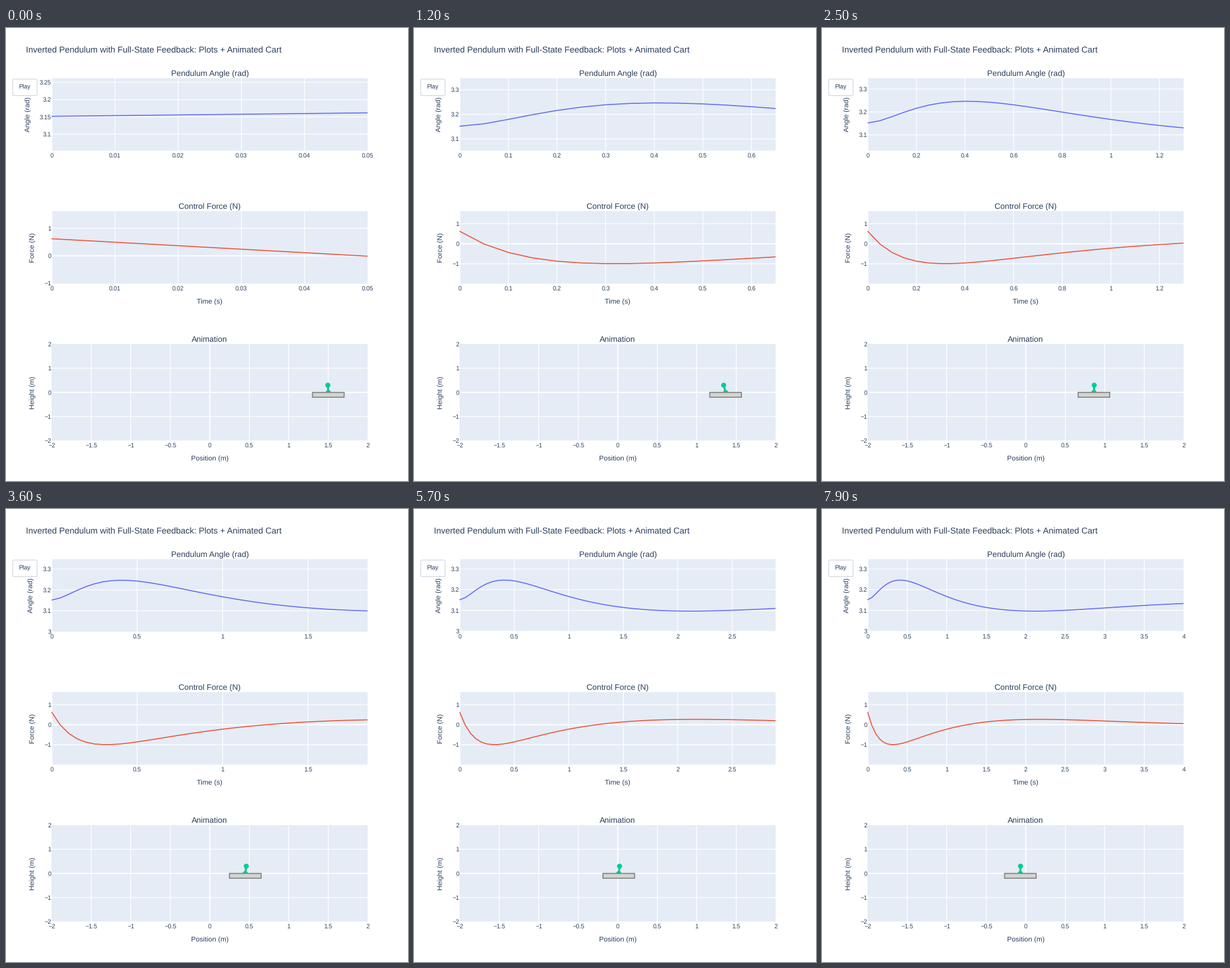
These frames come from a looping animation (706 px wide and 794 px high, 8000 ms). A matplotlib script:

```python
import numpy as np
import matplotlib.pyplot as plt
from matplotlib.animation import FuncAnimation
from matplotlib.patches import Circle, FancyBboxPatch, Rectangle

plt.rcParams["font.family"] = "Liberation Sans"
plt.rcParams["text.hinting"] = "none"

DPI, STAGE_W, STAGE_H = 100, 706, 794
W, H = 800, 900                      # layout units
PT = STAGE_W / W * 72 / DPI          # layout unit -> points
LEFT, RIGHT = 91, 720
MID = (LEFT + RIGHT) / 2
INK, PANEL = "#2a3f5f", "#E5ECF6"
BLUE, RED, GREEN = "#636EFA", "#EF553B", "#00CC96"
DT, FRAMES = 0.05, 80
ROD = 0.3


def simulate(steps):
    """Cart and pendulum, linearised about upright, with state feedback."""
    M, m, b, inertia, l, g = 0.5, 0.2, 0.1, 0.006, 0.3, 9.8
    j = inertia + m * l**2
    p = inertia * (M + m) + M * m * l**2
    A = np.array([[0, 1, 0, 0],
                  [0, -j * b / p, (m * l)**2 * g / p, 0],
                  [0, 0, 0, 1],
                  [0, -m * l * b / p, m * g * l * (M + m) / p, 0]])
    B = np.array([0, j / p, 0, m * l / p])
    gain = np.array([-1, -1.6567, 18.6854, 3.4594])
    state = np.array([1.5, 0, 0.01, 0.2])
    states, forces = [], []
    for _ in range(steps):
        u = -gain @ state
        states.append(state)
        forces.append(u)
        state = state + DT * (A @ state + B * u)
    states = np.array(states)
    return states[:, 0], np.pi + states[:, 2], np.array(forces)


time = DT * np.arange(FRAMES + 1)
cart, angle, force = simulate(FRAMES + 1)

fig = plt.figure(figsize=(STAGE_W / DPI, STAGE_H / DPI), dpi=DPI, facecolor="white")
ax = fig.add_axes([0, 0, 1, 1])
ax.set(xlim=(0, W), ylim=(H, 0))
ax.axis("off")


def label(x, y, text, size, ha="center", **kw):
    return ax.text(x, y, text, size=size * PT, color=INK, ha=ha, va="baseline",
                   rotation_mode="anchor", zorder=6, **kw)


def ticks(lo, hi, length, min_px):
    """Multiples of a round step (2, 5 or 10 times a power of ten)."""
    rough = (hi - lo) / (np.clip(length / min_px, 4, 9) + 1)
    base = 10 ** np.floor(np.log10(rough))
    step = base * next(s for s in (2, 5, 10) if s > rough / base)
    first, last = np.ceil(lo / step - 1e-6), np.floor(hi / step + 1e-6)
    return [round(i * step, 6) + 0.0 for i in np.arange(first, last + 1)]


def tick_text(v):
    return f"{v:g}".replace("-", "\u2212")


def text_width(s):
    widths = {".": .278, "\u2212": .584}
    return 12 * sum(widths.get(c, .556) for c in s)


class Panel:
    def __init__(self, top, bottom, title, ylabel, xlabel=""):
        self.top, self.bottom, self.ylabel = top, bottom, ylabel
        self.live = []
        self.bg = ax.add_patch(Rectangle((LEFT, top), RIGHT - LEFT, bottom - top,
                                         fc=PANEL, lw=0, zorder=1))
        label(MID, top - 4.6, title, 16)
        label(MID, bottom + 40, xlabel, 14)

    def px(self, x):
        return LEFT + (x - self.x0) / (self.x1 - self.x0) * (RIGHT - LEFT)

    def py(self, y):
        return self.bottom - (y - self.y0) / (self.y1 - self.y0) * (self.bottom - self.top)

    def line(self, xs, ys, color, width, z, **kw):
        item, = ax.plot(xs, ys, color=color, lw=width * PT, zorder=z, **kw)
        item.set_clip_path(self.bg)
        self.live.append(item)

    def rule(self, value, pos, lo, hi, xs, ys):
        if value == 0:
            self.line(xs, ys, "white", 2.4, 2.5, snap=False)
        elif lo + 1 < pos < hi - 1:
            self.line(xs, ys, "white", 1.5, 2, snap=False)

    def set_range(self, x0, x1, y0, y1):
        for item in self.live:
            item.remove()
        self.live = []
        self.x0, self.x1, self.y0, self.y1 = x0, x1, y0, y1
        for v in ticks(x0, x1, RIGHT - LEFT, 80):
            x = self.px(v)
            self.rule(v, x, LEFT, RIGHT, [x, x], [self.top, self.bottom])
            self.live.append(label(x, self.bottom + 13.2, tick_text(v), 12))
        widest = 0
        for v in ticks(y0, y1, self.bottom - self.top, 40):
            y, text = self.py(v), tick_text(v)
            widest = max(widest, text_width(text))
            self.rule(v, y, self.top, self.bottom, [LEFT, RIGHT], [y, y])
            self.live.append(label(LEFT - 1, y + 4.2, text, 12, "right"))
        self.live.append(label(LEFT - 20 - widest, (self.top + self.bottom) / 2,
                               self.ylabel, 14, rotation=90))

    def trace(self, xs, ys, color):
        self.line(self.px(xs), self.py(ys), color, 2, 3)


label(40, 50, "Inverted Pendulum with Full-State Feedback: Plots + Animated Cart",
      17, "left")
ax.add_patch(FancyBboxPatch((13.4, 101.5), 48.4, 32.8,
                            boxstyle="round,pad=0,rounding_size=2",
                            fc="white", ec="#BEC8D9", lw=PT, zorder=5))
label(37, 121.3, "Play", 12)

angle_panel = Panel(100, 244, "Pendulum Angle (rad)", "Angle (rad)")
force_panel = Panel(364, 508, "Control Force (N)", "Force (N)", "Time (s)")
scene = Panel(628, 820, "Animation", "Height (m)", "Position (m)")
scene.set_range(-2, 2, -2, 2)

rod, = ax.plot([], [], color=GREEN, lw=4 * PT, zorder=3, snap=False)
pivot, bob = (ax.add_patch(Circle((0, 0), 5, fc=GREEN, lw=0, zorder=3))
              for _ in range(2))
body = ax.add_patch(Rectangle((0, scene.py(0)), scene.px(.4) - scene.px(0),
                              scene.py(-.2) - scene.py(0), fc="lightgray",
                              ec="gray", lw=2 * PT, zorder=4, snap=False))


def draw(k):
    n = k + 2
    t = time[:n]
    for panel, data, margin, color in ((angle_panel, angle, .1, BLUE),
                                       (force_panel, force, 1, RED)):
        ys = data[:n]
        panel.set_range(0, t[-1], ys.min() - margin, ys.max() + margin)
        panel.trace(t, ys, color)
    x, th = cart[k + 1], angle[k + 1]
    base = scene.px(x), scene.py(0)
    tip = scene.px(x + ROD * np.sin(th)), scene.py(-ROD * np.cos(th))
    rod.set_data(*zip(base, tip))
    pivot.center, bob.center = base, tip
    body.set_x(scene.px(x - .2))
    return []


anim = FuncAnimation(fig, draw, frames=FRAMES, interval=100, repeat=True,
                     repeat_delay=0, blit=False)
plt.show()
```
